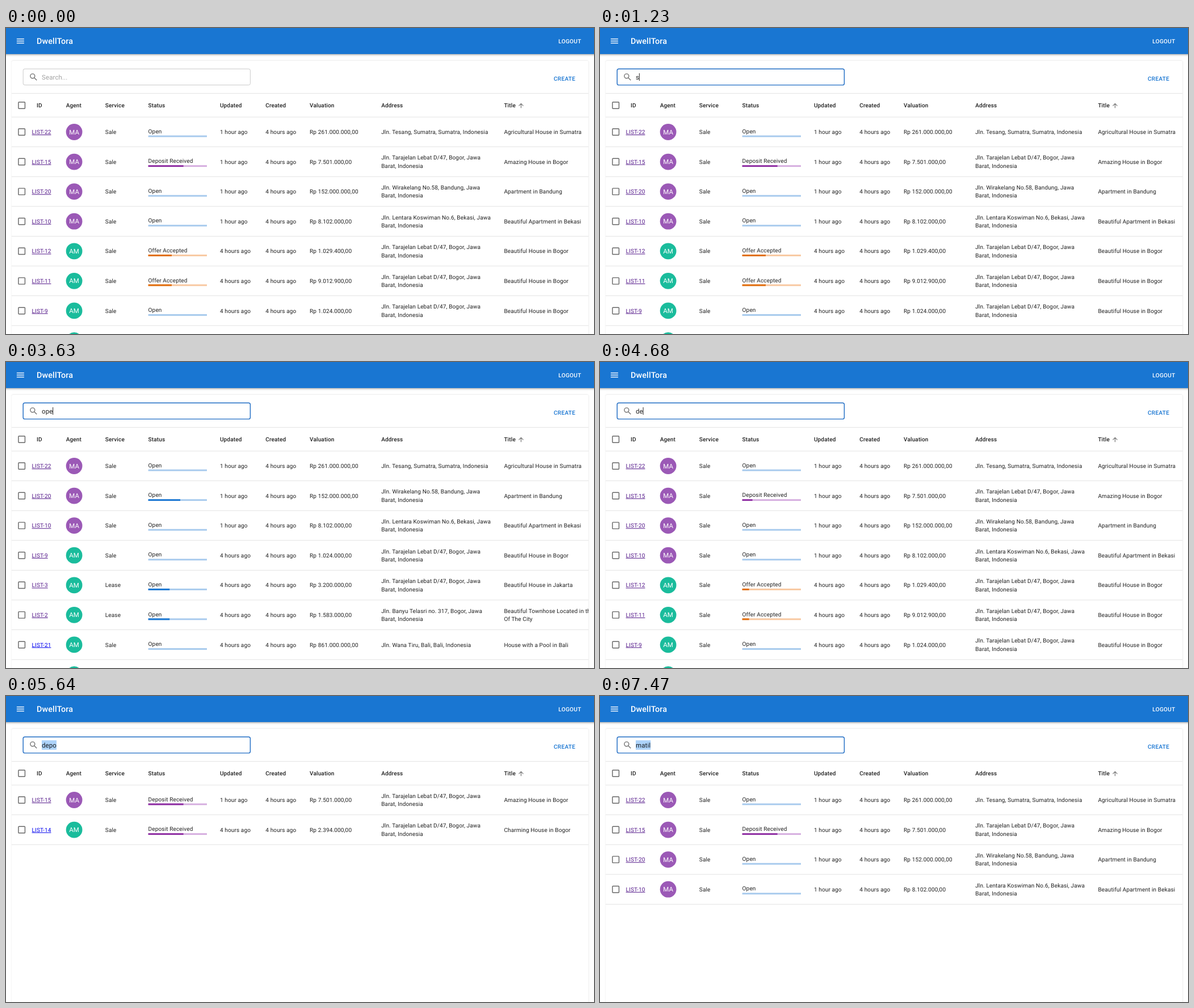
An HTML page that plays this animation: 1036x540 px, repeating every 8 s.

```html
<!DOCTYPE html>
<html lang="en">
<head>
<meta charset="utf-8">
<title>Listings</title>
<style>
  html, body { margin: 0; width: 100%; height: 100%; overflow: hidden; background: #fff; }
  svg { display: block; width: 1036px; height: 540px; }
  text {
    font: 400 10.07px Roboto, Arial, sans-serif; letter-spacing: .108px;
    fill: rgba(0, 0, 0, .87); text-rendering: geometricPrecision; white-space: pre;
  }
  .head { font-weight: 500; }
  .btn { font-weight: 500; letter-spacing: .288px; }
  .brand { font-size: 14.39px; font-weight: 500; fill: #fff; }
  .input { font-size: 11.51px; }
  .initials { font-size: 11.51px; letter-spacing: 0; fill: #fff; text-anchor: middle; }
  .link { fill: #551a8b; text-decoration: underline; }
  .new { fill: #0000ee; }
  .bar {
    fill: #1976d2;
    filter: drop-shadow(0 1.4px 1.4px rgba(0,0,0,.22)) drop-shadow(0 1.4px 2.2px rgba(0,0,0,.2));
  }
  .card {
    fill: #fff;
    filter: drop-shadow(0 .7px .5px rgba(0,0,0,.13)) drop-shadow(0 .7px 1px rgba(0,0,0,.1));
  }
</style>
</head>
<body>
<svg id="stage" viewBox="0 0 1036 540" xmlns="http://www.w3.org/2000/svg"></svg>
<script>
const LOOP = 8000, BLINK = 470, GLIDE = 400;
const PITCH = 52.57, FIRST = 183.5, BAR_W = 103.4, INPUT_X = 63;
const NS = 'http://www.w3.org/2000/svg';
const stage = document.getElementById('stage');

function add(parent, tag, attrs = {}, content) {
  const el = document.createElementNS(NS, tag);
  for (const key in attrs) el.setAttribute(key, attrs[key]);
  if (content !== undefined) el.textContent = content;
  parent.appendChild(el);
  return el;
}
const rect = (parent, x, y, width, height, fill, more) =>
  add(parent, 'rect', { x, y, width, height, fill, ...more });
const label = (parent, x, y, content, cls = '') =>
  add(parent, 'text', { x, y, class: cls }, content);

// One or two lines, centred on cy; "|" breaks the line
function cell(parent, x, cy, content) {
  const lines = content.split('|');
  lines.forEach((line, i) =>
    label(parent, x, cy + 3.6 + (i - (lines.length - 1) / 2) * 14.39, line));
}
const checkbox = (parent, cy) => rect(parent, 21.95, cy - 5.75, 11.5, 11.5, 'none',
  { rx: .9, stroke: '#666', 'stroke-width': 1.44 });
const divider = (parent, y) => rect(parent, 10, y - .4, 1016.4, .8, '#dcdcdc');

const STATUS = {
  open: { name: 'Open', value: 0, fill: '#1976d2', track: '#a7caed' },
  offer: { name: 'Offer Accepted', value: 40, fill: '#e06c0c', track: '#f8c79f' },
  deposit: { name: 'Deposit Received', value: 60, fill: '#8e2da2', track: '#d5addf' }
};
const AGENTS = { MA: '#9b59b6', AM: '#1abc9c' };
const GROVE = 'Jln. Tarajelan Lebat D/47, Bogor, Jawa|Barat, Indonesia';
const BOGOR = 'Beautiful House in Bogor';

const house = (agent, service, status, price, address, title) =>
  ({ agent, service, status: STATUS[status], price, address, title });
const HOUSES = {
  22: house('MA', 'Sale', 'open', '261.000.000', 'Jln. Tesang, Sumatra, Sumatra, Indonesia', 'Agricultural House in Sumatra'),
  15: house('MA', 'Sale', 'deposit', '7.501.000', GROVE, 'Amazing House in Bogor'),
  20: house('MA', 'Sale', 'open', '152.000.000', 'Jln. Wirakelang No.58, Bandung, Jawa|Barat, Indonesia', 'Apartment in Bandung'),
  10: house('MA', 'Sale', 'open', '8.102.000', 'Jln. Lentara Koswiman No.6, Bekasi, Jawa|Barat, Indonesia', 'Beautiful Apartment in Bekasi'),
  12: house('AM', 'Sale', 'offer', '1.029.400', GROVE, BOGOR),
  11: house('AM', 'Sale', 'offer', '9.012.900', GROVE, BOGOR),
  9: house('AM', 'Sale', 'open', '1.024.000', GROVE, BOGOR),
  3: house('AM', 'Lease', 'open', '3.200.000', GROVE, 'Beautiful House in Jakarta'),
  2: house('AM', 'Lease', 'open', '1.583.000', 'Jln. Banyu Telasri no. 317, Bogor, Jawa|Barat, Indonesia', 'Beautiful Townhose Located in the Heart|Of The City'),
  21: house('AM', 'Sale', 'open', '861.000.000', 'Jln. Wana Tiru, Bali, Bali, Indonesia', 'House with a Pool in Bali'),
  14: house('AM', 'Sale', 'deposit', '2.394.000', GROVE, 'Charming House in Bogor')
};
const UNVISITED = [14, 21];

const ALL = [22, 15, 20, 10, 12, 11, 9, 3];
const VIEWS = [
  { at: 0, ids: ALL },
  { at: 3595, ids: [22, 20, 10, 9, 3, 2, 21, 12] },
  { at: 4565, ids: ALL },
  { at: 4697, ids: [15, 14] },
  { at: 6493, ids: ALL },
  { at: 6650, ids: [22, 15, 20, 10] }
];

// time, text, all selected
const KEYS = [
  [180, ''], [1215, 's'], [1400, 'sa'], [1570, 'sal'], [2015, 'sale'], [2930, 'sale', true],
  [3320, 'o'], [3500, 'op'], [3590, 'ope'], [3650, 'open'], [4215, 'open', true],
  [4430, 'd'], [4570, 'de'], [4695, 'dep'], [4790, 'depo'], [5630, 'depo', true],
  [6350, 'm'], [6493, 'ma'], [6630, 'mat'], [6750, 'mati'], [6880, 'matil'], [7460, 'matil', true]
];

// Card and search field
rect(stage, 0, 0, 1036, 540, '#fff');
rect(stage, 10, 57.5, 1016.4, 520, '#fff', { class: 'card', rx: 2.9 });
const field = rect(stage, 30.2, 72.2, 400.2, 28.4, 'none', { rx: 2.9 });
const glass = add(stage, 'g', {
  transform: 'translate(40 78) scale(.7194)', fill: 'none', stroke: '#757575', 'stroke-width': 2
});
add(glass, 'circle', { cx: 9.5, cy: 9.5, r: 5.5 });
add(glass, 'path', { d: 'M13.6 13.6L19.75 19.75' });
const selection = rect(stage, INPUT_X, 78.2, 0, 16.6, '#add3fa');
const typed = label(stage, INPUT_X, 90.5, '', 'input');
const caret = rect(stage, INPUT_X, 79.8, .9, 13.4, '#111');
label(stage, 965, 93.1, 'CREATE', 'btn').style.fill = '#1976d2';

// Table
add(add(stage, 'clipPath', { id: 'table' }), 'rect', { x: 9, y: 100, width: 1017.6, height: 440 });
const table = add(stage, 'g', { 'clip-path': 'url(#table)' });
divider(table, 115.3);
divider(table, 157.1);
checkbox(table, 136.5);
const COLUMNS = {
  ID: 54, Agent: 105.7, Service: 174.8, Status: 250.6, Updated: 376.9,
  Created: 457.3, Valuation: 535, Address: 661.2, Title: 877.4
};
for (const name in COLUMNS) label(table, COLUMNS[name], 140.1, name, 'head');
add(table, 'path', {
  transform: 'translate(901 130.5) scale(.54)', fill: '#666',
  d: 'M4 12l1.41 1.41L11 7.83V20h2V7.83l5.58 5.59L20 12l-8-8-8 8z'
});

function buildRow(parent, id, index) {
  const h = HOUSES[id], cy = FIRST + index * PITCH;
  checkbox(parent, cy);
  label(parent, 45.6, cy + 3.6, 'LIST-' + id, UNVISITED.includes(id) ? 'link new' : 'link');
  add(parent, 'circle', { cx: 120.1, cy, r: 14.4, fill: AGENTS[h.agent] });
  label(parent, 120.1, cy + 4.1, h.agent, 'initials');
  cell(parent, COLUMNS.Service, cy, h.service);
  label(parent, COLUMNS.Status, cy + 2.2, h.status.name);
  rect(parent, COLUMNS.Status, cy + 6.1, BAR_W, 2.9, h.status.track);
  const fill = rect(parent, COLUMNS.Status, cy + 6.1, 0, 2.9, h.status.fill);
  cell(parent, COLUMNS.Updated, cy, h.agent === 'MA' ? '1 hour ago' : '4 hours ago');
  cell(parent, COLUMNS.Created, cy, '4 hours ago');
  cell(parent, COLUMNS.Valuation, cy, 'Rp ' + h.price + ',00');
  cell(parent, COLUMNS.Address, cy, h.address);
  cell(parent, COLUMNS.Title, cy, h.title);
  divider(parent, cy + 26.2);
  return fill;
}
for (const view of VIEWS) {
  view.group = add(table, 'g');
  view.fills = view.ids.map((id, i) => buildRow(view.group, id, i));
}

// App bar
rect(stage, -10, -10, 1056, 56, '#1976d2', { class: 'bar' });
for (const y of [19.4, 23, 26.6]) rect(stage, 18.9, y - .72, 13, 1.44, '#fff');
label(stage, 54, 28.1, 'DwellTora', 'brand');
label(stage, 973.3, 26.6, 'LOGOUT', 'btn').style.fill = '#fff';

const glide = (bar, t) =>
  bar.from + (bar.to - bar.from) * Math.min(1, (t - bar.start) / GLIDE);

// Each row slot keeps its bar when the list changes and slides to the new value
function barValue(slot, t) {
  let bar = null;
  for (const { at, ids } of VIEWS) {
    if (at > t) break;
    if (slot >= ids.length) { bar = null; continue; }
    const to = HOUSES[ids[slot]].status.value;
    if (!bar) bar = { from: to, to, start: at };
    else if (bar.to !== to) bar = { from: glide(bar, at), to, start: at };
  }
  return glide(bar, t);
}

const show = (el, on) => el.setAttribute('visibility', on ? 'visible' : 'hidden');

function drawSearch(t) {
  const key = KEYS.filter(k => k[0] <= t).pop();
  const [at, text, selected] = key || [0, '', false];
  field.setAttribute('stroke', key ? '#1f6cc4' : '#c4c4c4');
  field.setAttribute('stroke-width', key ? 1.44 : .9);
  typed.textContent = text || 'Search...';
  typed.style.fill = text ? '' : '#a2a2a2';
  const width = text ? typed.getComputedTextLength() : 0;
  selection.setAttribute('width', width);
  show(selection, selected);
  caret.setAttribute('x', INPUT_X + width - .2);
  show(caret, key && !selected && (t - at) % (2 * BLINK) < BLINK);
}

function draw(t) {
  drawSearch(t);
  const current = VIEWS.filter(v => v.at <= t).pop();
  for (const view of VIEWS) view.group.setAttribute('display', view === current ? 'inline' : 'none');
  current.fills.forEach((fill, i) => fill.setAttribute('width', BAR_W * barValue(i, t) / 100));
}

const begin = performance.now();
function tick() {
  draw((performance.now() - begin) % LOOP);
  requestAnimationFrame(tick);
}
tick();
</script>
</body>
</html>
```
